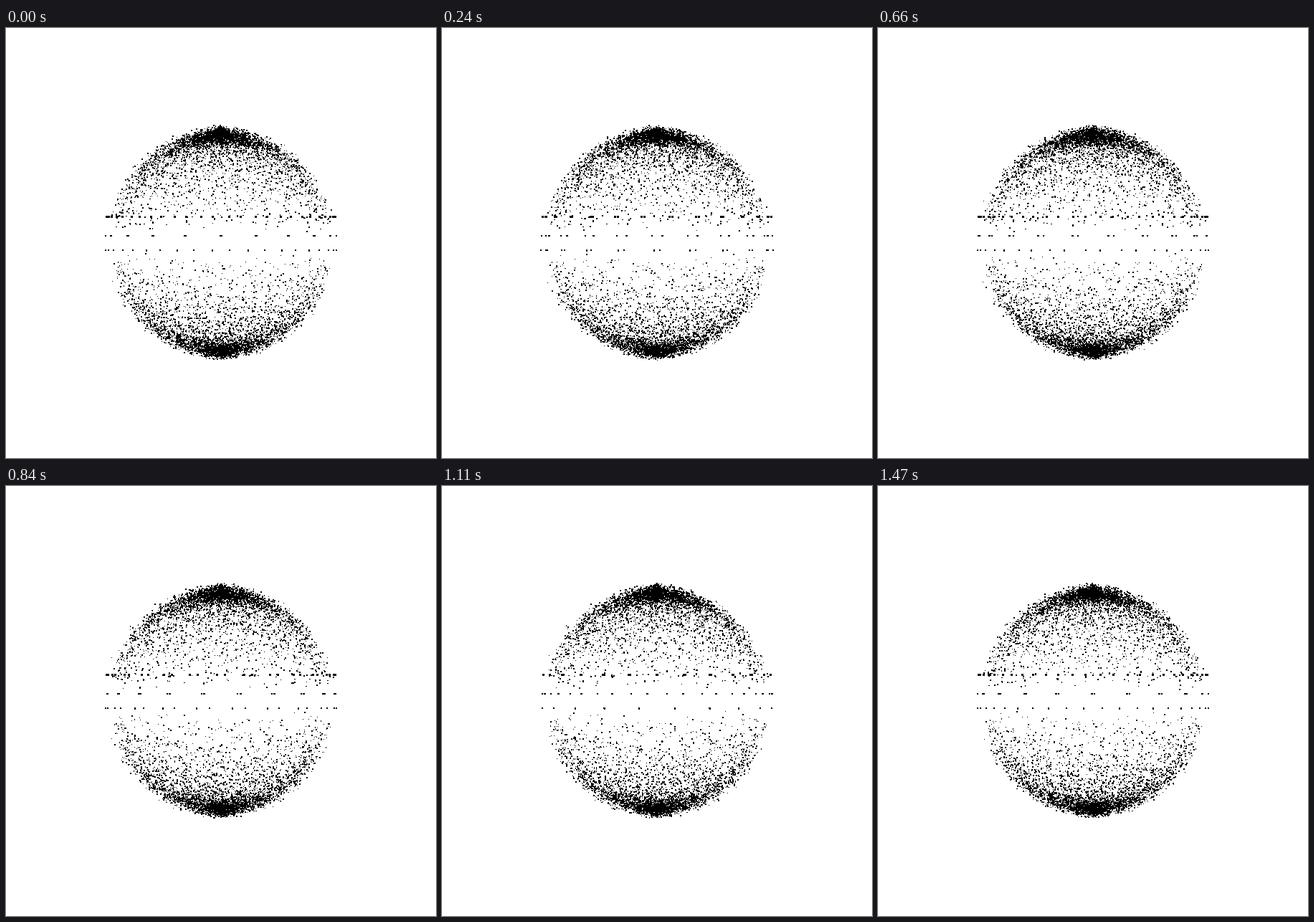
An HTML page with a canvas for the animation above (1.5 s loop, 600 by 600 pixels).

```html
<!DOCTYPE html>
<html lang="en">
<head>
<meta charset="utf-8">
<title>Particle sphere</title>
<style>
html, body { margin: 0; width: 100%; height: 100%; overflow: hidden; background: #fff; }
canvas { display: block; width: 600px; height: 600px; }
</style>
</head>
<body>
<canvas id="stage" width="600" height="600"></canvas>
<script>
const LOOP = 1500, STEP = 30, CENTER = 300, RADIUS = 152;
const TAU = Math.PI * 2;
const RINGS = 210; // per hemisphere
const ctx = document.getElementById('stage').getContext('2d');

let seed = 20117;
function rnd() {
  seed = (seed + 0x6D2B79F5) | 0;
  let x = Math.imul(seed ^ (seed >>> 15), 1 | seed);
  x = (x + Math.imul(x ^ (x >>> 7), 61 | x)) ^ x;
  return ((x ^ (x >>> 14)) >>> 0) / 4294967296;
}
const spread = a => (rnd() * 2 - 1) * a;
const phase = () => rnd() * TAU;

// Each ring carries evenly spaced dots; one loop moves every dot to the next slot.
function makeRing(lat, count, start, radius, wobble, bold) {
  return {
    lat, count, start, radius, wobble,
    p: Array.from({ length: 5 }, phase),
    size: 1.45 + bold + spread(0.7),
    tall: spread(0.5)
  };
}

const rings = [
  makeRing(Math.asin(37 / 164), 26, 0.069, 164, 0, 1),
  makeRing(Math.asin(-10 / 162), 20, 0.24, 162, 0, 0.6),
  makeRing(Math.asin(10 / 161), 20, 0.937, 161, 0, 0.6)
];
for (const side of [1, -1]) {
  for (let j = 2; j < RINGS; j++) {
    // Latitudes crowd towards the poles.
    const lat = Math.PI / 2 * Math.sqrt((j + rnd()) / RINGS);
    rings.push(makeRing(side * lat, 20, phase(), RADIUS + spread(5), 1, 0));
  }
}

function drawRing(ring, t) {
  const { p, wobble } = ring;
  for (let k = 0; k < ring.count; k++) {
    const a = ring.start + (k + t) / ring.count * TAU;
    const lon = a + wobble * 0.07 * Math.sin(5 * a + p[0]);
    const lat = ring.lat + wobble * (0.045 * Math.sin(4 * a + p[1]) + 0.035 * Math.sin(11 * a + p[2]));
    const r = ring.radius + wobble * (4 * Math.sin(5 * a + p[3]) + 4 * Math.sin(9 * a + p[4]));
    const flat = Math.cos(lat);
    const x = CENTER + r * flat * Math.sin(lon);
    const y = CENTER - r * Math.sin(lat);
    const s = ring.size + 0.35 * flat * Math.cos(lon);
    const w = Math.max(1, Math.round(s));
    const h = Math.max(1, Math.round(s + ring.tall));
    ctx.fillRect(Math.round(x - w / 2), Math.round(y - h / 2), w, h);
  }
}

function draw(ms) {
  const t = Math.floor(ms % LOOP / STEP) * STEP / LOOP;
  ctx.fillStyle = '#fff';
  ctx.fillRect(0, 0, 600, 600);
  ctx.fillStyle = '#000';
  for (const ring of rings) drawRing(ring, t);
}

const begin = performance.now();
function tick() {
  draw(performance.now() - begin);
  requestAnimationFrame(tick);
}
tick();
</script>
</body>
</html>
```
